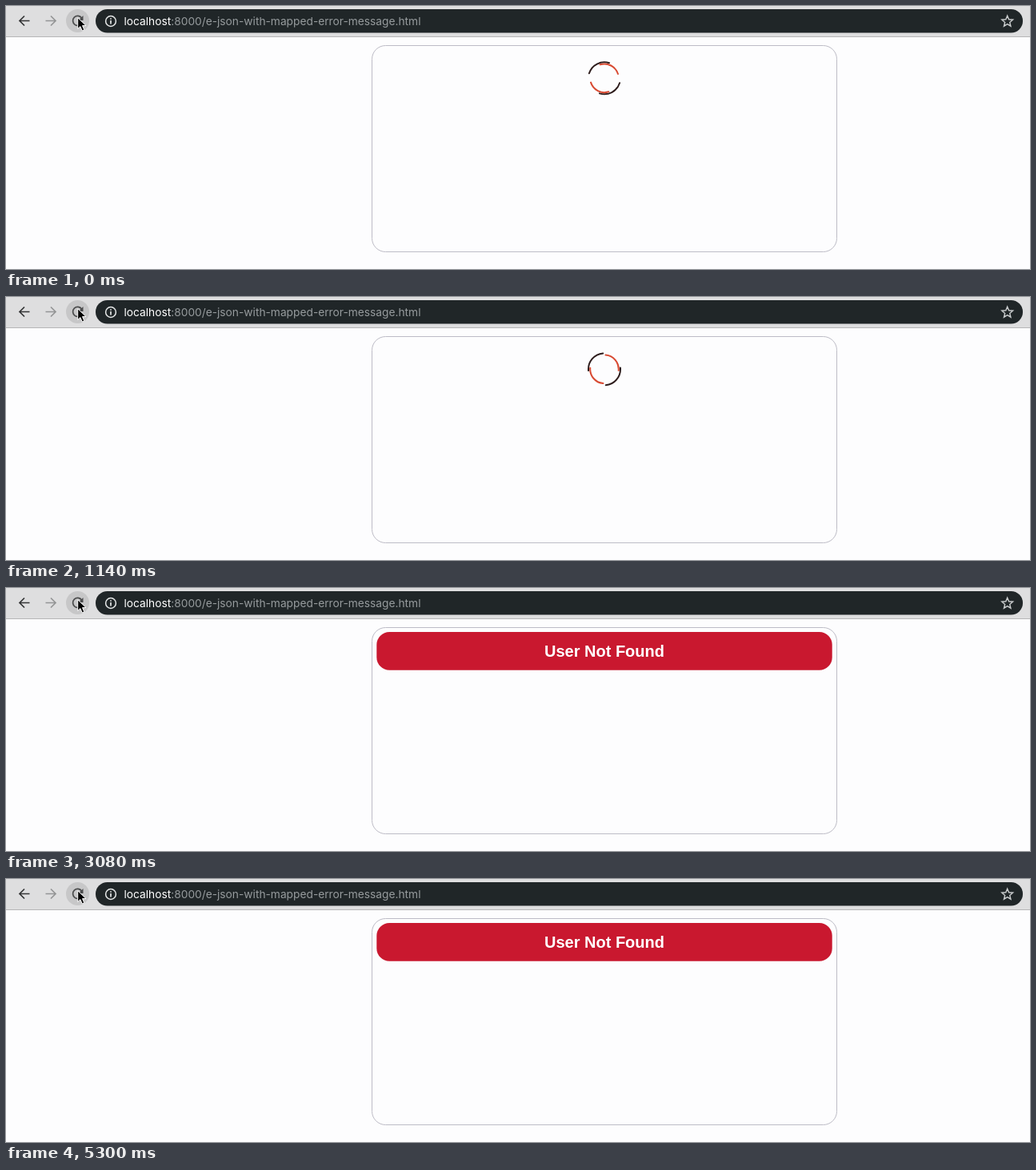
Animation, 1280 px wide and 329 px high, one loop 5.4 s. Source, as an HTML page:

```html
<!DOCTYPE html>
<html lang="en">
<head>
<meta charset="utf-8">
<title>Mapped error message</title>
<style>
  html, body { margin: 0; width: 100%; height: 100%; overflow: hidden; background: #fdfdfe; }
  svg { display: block; width: 100%; height: 100%; }
  .url { font: 13.75px Inter, sans-serif; fill: #969b9d; }
  .url .host { fill: #fff; }
  .alert { font: bold 20px "Liberation Sans", Arial, sans-serif; fill: #fff; text-anchor: middle; }
  .icon { fill: none; stroke-width: 1.7; }
</style>
</head>
<body>
<svg viewBox="0 0 1280 329" preserveAspectRatio="none">
  <rect width="1280" height="329" fill="#fdfdfe"/>

  <rect width="1280" height="38" fill="#dededf"/>
  <rect y="38" width="1280" height="1" fill="#b5b5b6"/>
  <path class="icon" stroke="#343536" d="M29.5 18.5H17.5M23 12.5L17 18.5L23 24.5"/>
  <path class="icon" stroke="#949596" d="M49.5 18.5H61.5M56 12.5L62 18.5L56 24.5"/>
  <circle cx="89.5" cy="18.5" r="14.5" fill="#c7c7c8"/>
  <path class="icon" stroke="#4a4b4c" d="M94.5 15A6 6 0 1 0 95 21"/>
  <path fill="#4a4b4c" d="M96.5 12V18H90.5Z"/>

  <rect x="112" y="4" width="1159" height="29.5" rx="14.75" fill="#202628"/>
  <circle class="icon" cx="131" cy="19" r="6.4" stroke="#e6e8e8" style="stroke-width:1.5"/>
  <path class="icon" stroke="#e6e8e8" d="M131 18V22.6M131 15.2V16.8"/>
  <text class="url" x="147.5" y="24"><tspan class="host">localhost</tspan>:8000/e-json-with-mapped-error-message.html</text>
  <path id="star" class="icon" stroke="#c9cccd" style="stroke-width:1.4"/>

  <path d="M89.7 14.6V28.6L92.9 25.6L95.2 30.9L97.8 29.8L95.5 24.6H100Z" fill="#000" stroke="#fff" stroke-width="1"/>

  <rect x="457.5" y="49.5" width="581" height="258" rx="17" fill="none" stroke="#bdbcc6"/>
  <g id="spinner" fill="none" stroke-width="2" stroke-linecap="round">
    <path id="outer" stroke="#2e1d1d"/>
    <path id="inner" stroke="#d84a32"/>
  </g>
  <g id="error">
    <rect x="463.3" y="55" width="569.4" height="47.7" rx="16" fill="#c9182f"/>
    <text class="alert" x="748" y="86">User Not Found</text>
  </g>
</svg>
<script>
const LOOP = 5400, ERROR_AT = 1960;
const CX = 748, CY = 90.3;
// [step, outer ring angle]
const TURN = [[0, 62.5], [16, 162.5], [25, 220], [36, 283], [48, 356]];
const $ = id => document.getElementById(id);

const polar = (cx, cy, r, deg) => {
  const a = deg * Math.PI / 180;
  return (cx + r * Math.cos(a)).toFixed(2) + ' ' + (cy + r * Math.sin(a)).toFixed(2);
};

const arc = (r, mid) =>
  `M${polar(CX, CY, r, mid - 45)}A${r} ${r} 0 0 1 ${polar(CX, CY, r, mid + 45)}`;

const arcPair = (r, mid) => arc(r, mid) + arc(r, mid + 180);

// Steps last 20, 100 and 20 ms in turn.
function stepAt(t) {
  const rest = t % 140;
  return Math.floor(t / 140) * 3 + (rest >= 20) + (rest >= 120);
}

function angleAt(step) {
  let i = 1;
  while (i < TURN.length - 1 && step > TURN[i][0]) i++;
  const [s0, a0] = TURN[i - 1], [s1, a1] = TURN[i];
  return a0 + (a1 - a0) * (step - s0) / (s1 - s0);
}

function render(t) {
  const failed = t >= ERROR_AT;
  $('error').style.display = failed ? '' : 'none';
  $('spinner').style.display = failed ? 'none' : '';
  if (failed) return;
  const angle = angleAt(stepAt(t));
  $('outer').setAttribute('d', arcPair(20, angle));
  $('inner').setAttribute('d', arcPair(17.8, -angle));
}

const points = Array.from({ length: 10 }, (_, i) =>
  polar(1251.7, 19.4, i % 2 ? 3.2 : 7.2, i * 36 - 90));
$('star').setAttribute('d', 'M' + points.join('L') + 'Z');

const start = performance.now();
function tick() {
  render((performance.now() - start) % LOOP);
  requestAnimationFrame(tick);
}
tick();
</script>
</body>
</html>
```
